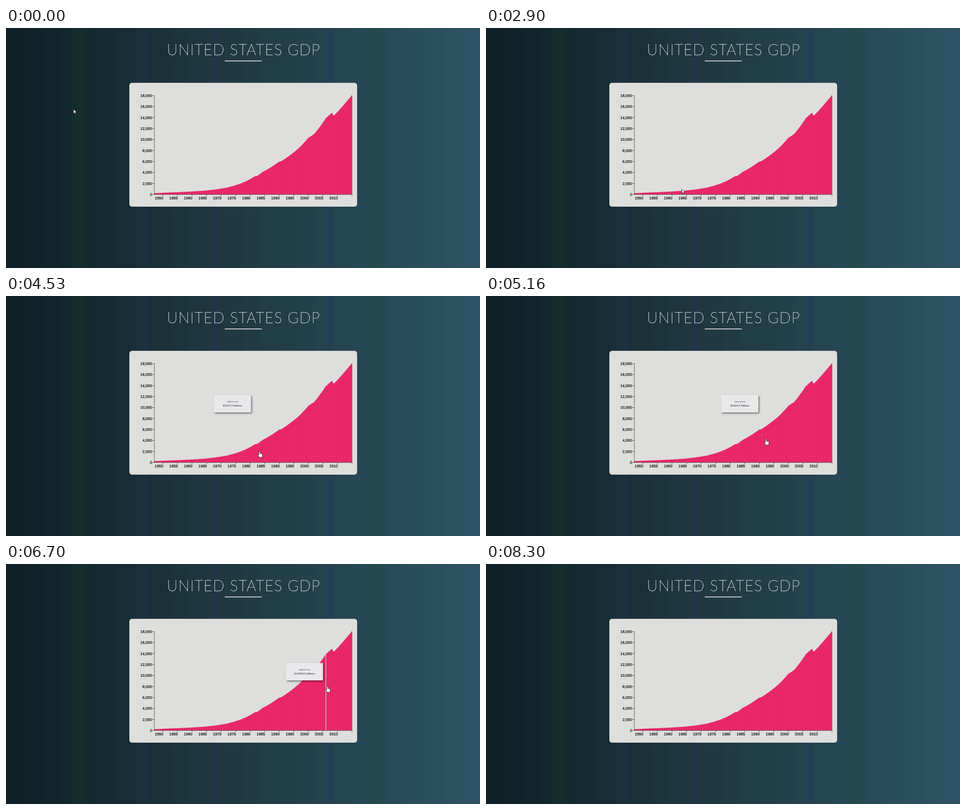
An HTML page with a canvas for the animation above (9.46 s loop, 1053x532 px).

```html
<!DOCTYPE html>
<html lang="en">
<head>
<meta charset="utf-8">
<title>United States GDP</title>
<style>
html, body { margin: 0; width: 100%; height: 100%; overflow: hidden; background: #203a43; }
canvas { display: block; }
</style>
</head>
<body>
<canvas id="stage" width="1053" height="532"></canvas>
<script>
const ctx = document.getElementById('stage').getContext('2d');
const LOOP = 9460, WIDTH = 1053, LEFT = 329, BASE = 369, PITCH = 1.6, BARS = 275;
const PER_UNIT = 219 / 18000;
const HOVER_FROM = 2960, HOVER_TO = 7860;
const PINK = '#e91e63', CARD = '#dededc', INK = '#444';

// Linear interpolation over [position, value, ...] keys
function at(keys, p, col = 1) {
  const n = keys.findIndex(k => k[0] > p);
  if (n === 0) return keys[0][col];
  if (n < 0) return keys[keys.length - 1][col];
  const a = keys[n - 1], b = keys[n];
  return a[col] + (b[col] - a[col]) * (p - a[0]) / (b[0] - a[0]);
}

// Turning points (quarter, billions) with steady percentage growth between them
const turns = [
  [0, 243.1], [16, 336.4], [52, 543.3], [68, 671.1], [100, 1233.8], [123, 2168.7],
  [139, 3283.5], [143, 3407.8], [150, 4087.4], [173, 5974.7], [176, 6054.9], [200, 8402.1],
  [214, 10357.4], [222, 11037.1], [238, 13908.5], [246, 14843], [249, 14340.4],
  [267, 16957.6], [274, 18060.2]
].map(([q, v]) => [q, Math.log(v)]);
const gdp = Array.from({ length: BARS }, (_, i) => Math.exp(at(turns, i)));

// Pointer: time, x, y
const pointer = [
  [560, 150, 180], [1500, 218, 314], [2460, 416, 350], [2900, 435, 357], [3900, 494, 361],
  [4400, 551, 350], [5160, 622, 317], [6330, 703, 274], [6700, 714, 271], [7560, 759, 267],
  [7860, 774, 268], [8000, 774, 268], [8260, 27, 293]
];
// Bar shown in the tooltip, trailing the pointer: time, index
const hover = [
  [HOVER_FROM, 67], [3900, 100], [5160, 176], [5400, 194], [6360, 231.5], [6700, 238],
  [7300, 256], [7560, 267], [HOVER_TO, 275]
];

const arrow = new Path2D('M0,0V9.6L2.2,7.6L3.8,11.2L5.4,10.5L3.9,7H6.8Z');
const hand = new Path2D('M-1.3,1Q-1.3,-.6 0,-.6Q1.3,-.6 1.3,1V4.6L5.4,5.6Q6.4,6 6.4,7.2V9.5' +
  'Q6.2,11.6 5,13.6H-.2Q-1.2,11.4 -3.6,8.7Q-4.2,7 -3,6.9L-1.3,8.3Z');

function rect(x, y, w, h, color) {
  ctx.fillStyle = color;
  ctx.fillRect(x, y, w, h);
}

// "weight" thickens the letters by a thin outline
function text(str, x, y, font, align, color = '#000', weight = 0) {
  ctx.font = font;
  ctx.textAlign = align;
  ctx.fillStyle = ctx.strokeStyle = color;
  ctx.fillText(str, x, y);
  if (weight) {
    ctx.lineWidth = weight;
    ctx.strokeText(str, x, y);
  }
}

function bar(i, color, width) {
  const h = gdp[i] * PER_UNIT;
  rect(LEFT + i * PITCH, BASE - h, width, h, color);
}

function drawBackground() {
  const step = WIDTH / 26;
  const stops = [[0, 15, 32, 39], [WIDTH / 2, 32, 58, 67], [WIDTH, 44, 83, 100]];
  for (let x = 0; x < WIDTH; x += step) {
    const rgb = [1, 2, 3].map(c => Math.round(at(stops, x + step / 2, c)));
    rect(Math.round(x), 0, step + 1, 532, `rgb(${rgb})`);
  }
  for (const x of [292, 455, 705]) rect(x, 0, 22, 532, 'rgba(44,50,100,.2)');
  for (const x of [147, 808]) rect(x, 0, 30, 532, 'rgba(30,80,30,.12)');
}

function drawPage() {
  drawBackground();
  ctx.letterSpacing = '1.55px';
  text('UNITED STATES GDP', 528, 60, '100 33px Lato, sans-serif', 'center', '#fff', 0.4);
  ctx.letterSpacing = '0px';
  rect(486, 72.3, 82, 1.5, '#fff');
  ctx.fillStyle = CARD;
  ctx.beginPath();
  ctx.roundRect(274, 121.5, 506, 274.5, 6);
  ctx.fill();
}

function drawAxes() {
  const font = '8.5px "Liberation Sans", Arial, sans-serif';
  rect(LEFT, 149, 0.9, 220, INK);
  rect(LEFT, BASE - 0.4, 440, 0.9, INK);
  for (let v = 0; v <= 18000; v += 2000) {
    const y = BASE - v * PER_UNIT;
    rect(LEFT - 4, y - 0.4, 4, 0.9, INK);
    text(v.toLocaleString('en-US'), 324.5, y + 3.1, font, 'right', '#000', 0.2);
  }
  for (let i = 0; i < 13; i++) {
    const x = 348.5 + i * 32.33;
    rect(x - 0.4, BASE, 0.9, 4, INK);
    text(1950 + i * 5, x - 8.6, 380.2, font, 'center', '#000', 0.2);
  }
  rect(768.4, BASE, 0.9, 4, INK);
}

function drawTip(i) {
  const x = LEFT + i * PITCH - 88, mid = x + 41.3;
  ctx.save();
  ctx.shadowColor = 'rgba(0,0,0,.55)';
  ctx.shadowBlur = 4;
  ctx.shadowOffsetX = ctx.shadowOffsetY = 2;
  rect(x, 219.5, 82.5, 38.5, '#e9e9ec');
  ctx.restore();
  const month = String(1 + i % 4 * 3).padStart(2, '0');
  const date = `${1947 + Math.floor(i / 4)}-${month}-01`;
  text(date, mid, 235.8, '4.6px Lato, sans-serif', 'center', '#222');
  text(`$${+gdp[i].toFixed(1)} billions`, mid, 245.3, '6.1px Lato, sans-serif', 'center', '#222');
}

function drawPointer(t, shape) {
  ctx.save();
  ctx.translate(at(pointer, t), at(pointer, t, 2));
  ctx.lineWidth = 0.8;
  ctx.lineJoin = 'round';
  ctx.fillStyle = '#fff';
  ctx.strokeStyle = '#111';
  ctx.fill(shape);
  ctx.stroke(shape);
  ctx.restore();
}

function draw(t) {
  const over = t >= HOVER_FROM && t < HOVER_TO;
  const current = Math.min(BARS - 1, Math.floor(at(hover, t)));
  drawPage();
  for (let i = 0; i < BARS; i++) bar(i, PINK, PITCH + 0.2);
  // Only a slow pointer leaves time for the bar to light up
  if (over && t >= 5400) bar(current, '#d3b4bc', PITCH);
  drawAxes();
  if (over) drawTip(current);
  if (t < 8300) drawPointer(t, over ? hand : arrow);
}

const start = performance.now();
function frame() {
  draw((performance.now() - start) % LOOP);
  requestAnimationFrame(frame);
}
frame();
</script>
</body>
</html>
```
